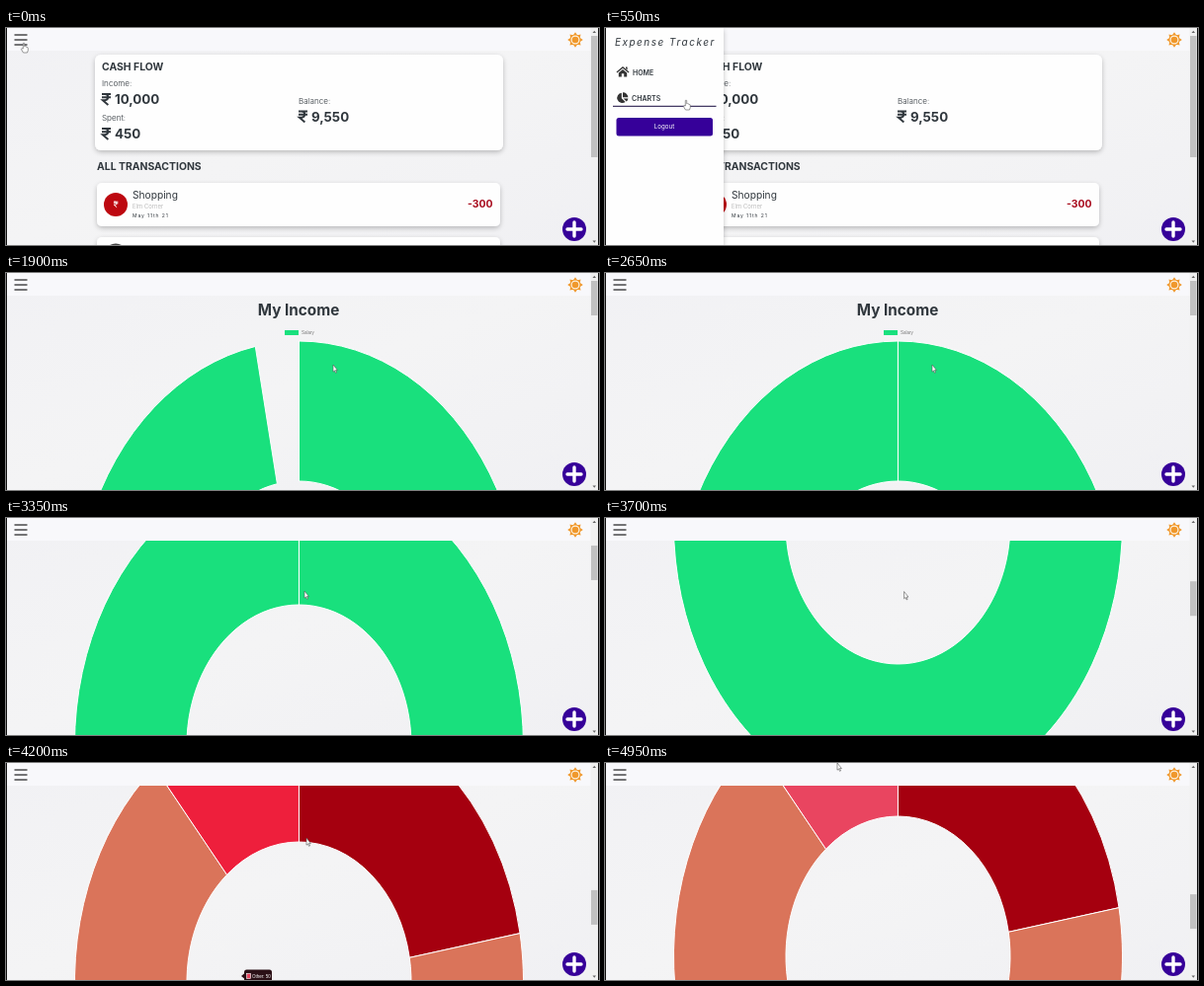
Animation of 600 by 220 pixels, one loop 5 s. Source, as an HTML page:

```html
<!DOCTYPE html>
<html lang="en">
<head>
<meta charset="utf-8">
<title>Expense Tracker</title>
<style>
html, body { margin: 0; width: 100%; height: 100%; overflow: hidden; background: #f2f2f4; }
svg { display: block; width: 600px; height: 220px; }
text { font-family: Inter, sans-serif; fill: #30373d; }
.h { font-weight: 700; font-size: 10.4px; }
.title { font-weight: 700; font-size: 15.3px; text-anchor: middle; }
.num { font-weight: 700; font-size: 13.3px; }
.label { font-weight: 300; font-size: 8.1px; }
.nav { font-weight: 600; font-size: 7px; }
.key { font-family: "Liberation Sans", Arial, sans-serif; font-size: 4.5px; fill: #777; }
</style>
</head>
<body>
<svg viewBox="0 0 600 220" xmlns="http://www.w3.org/2000/svg">
  <defs>
    <linearGradient id="paper" x2="1" y2="1">
      <stop offset="0" stop-color="#f1f1f4"/>
      <stop offset=".5" stop-color="#f4f4f5"/>
      <stop offset="1" stop-color="#f0f0f3"/>
    </linearGradient>
    <filter id="shade" x="-10%" y="-20%" width="120%" height="150%">
      <feDropShadow dx="0" dy="2" stdDeviation="2.5" flood-color="#000" flood-opacity=".24"/>
    </filter>
    <path id="rupee" d="M0 1H9M0 4.2H9M1 1H3.2C7.2 1 7.2 7.2 3.2 7.2H.8L6.4 12" fill="none" stroke-width="1.9"/>
  </defs>
  <rect width="600" height="220" fill="url(#paper)"/>

  <g id="home">
    <rect x="90" y="27" width="413" height="97" rx="6" fill="#fefefe" filter="url(#shade)"/>
    <text class="h" x="97" y="43">CASH FLOW</text>
    <text class="label" x="97" y="59">Income:</text>
    <text class="label" x="97" y="94">Spent:</text>
    <text class="label" x="296" y="77">Balance:</text>
    <g stroke="#30373d">
      <use href="#rupee" x="97" y="66"/>
      <use href="#rupee" x="97" y="101"/>
      <use href="#rupee" x="296" y="83.500"/>
    </g>
    <text class="num" x="110" y="77">10,000</text>
    <text class="num" x="110" y="112">450</text>
    <text class="num" x="309" y="95">9,550</text>
    <text class="h" x="92" y="143.500">ALL TRANSACTIONS</text>
    <rect x="92" y="157" width="408" height="44" rx="5" fill="#fefefe" filter="url(#shade)"/>
    <circle cx="111" cy="179" r="12" fill="#bd0810"/>
    <use href="#rupee" stroke="#fff" stroke-width="2" transform="translate(108.900 175.700) scale(.5)"/>
    <text x="128" y="172.500" font-size="10.200">Shopping</text>
    <text x="128" y="183" font-size="6" font-weight="300" style="fill:#aaa">Elm Corner</text>
    <text x="128" y="191.800" font-size="5" letter-spacing=".9">May 11th 21</text>
    <text class="h" x="492.500" y="182" text-anchor="end" style="fill:#a80a1c">-300</text>
    <rect x="92" y="212" width="408" height="44" rx="5" fill="#fefefe" filter="url(#shade)"/>
    <circle cx="111" cy="230.500" r="12" fill="#444"/>
  </g>

  <g id="charts">
    <text class="title" x="296" y="42.500">My Income</text>
    <g id="loaded">
      <g id="income"></g>
      <g transform="translate(0 615)">
        <text class="title" x="296" y="41">My Expenses</text>
        <g id="spent"></g>
        <g id="tip">
          <path d="M238 347l3-2.500v5z" fill="#2b1016"/>
          <rect x="241" y="340.500" width="28" height="13" rx="2.500" fill="#2b1016"/>
          <rect x="243.500" y="344.500" width="4" height="5" fill="#e94560" stroke="#fff" stroke-width=".6"/>
          <text class="key" x="249" y="348.600" style="fill:#fff">Other: 50</text>
        </g>
      </g>
    </g>
  </g>

  <rect width="600" height="23" fill="#f8f8fb"/>
  <path d="M8.500 7H21.500M8.500 12H21.500M8.500 17H21.500" stroke="#747476" stroke-width="2"/>
  <g transform="translate(576 12)">
    <path id="sun" fill="#f0982c"/>
    <circle r="3.900" fill="none" stroke="#fdf1df" stroke-width="1.200"/>
  </g>

  <g id="side">
    <rect x="-10" width="130" height="220" fill="#fefefe" filter="url(#shade)"/>
    <text x="10" y="17.500" font-size="10" font-style="italic" letter-spacing="1.500">Expense Tracker</text>
    <path d="M11.500 44.500L18 39l6.500 5.500-.8 1L18 40.800l-5.700 4.700zM21 39.500h1.600v3L21 41zM13.800 45.400L18 42l4.200 3.400V49.500H19.200V46.300H16.800V49.500H13.800z" fill="#333"/>
    <text class="nav" x="28" y="47.600">HOME</text>
    <path d="M16.800 65.700V71.200L20.600 75A5.200 5.200 0 1 1 16.800 65.700zM18 65.200A5.300 5.300 0 0 1 23.400 70.300H18zM18.700 71.400H23.400A5.300 5.300 0 0 1 21.800 74.600z" fill="#333"/>
    <text class="nav" x="27" y="74.300">CHARTS</text>
    <path id="under" d="M8 79.300H112.500" stroke="#433a63" stroke-width="1.200"/>
    <rect x="11.500" y="91" width="97.500" height="18.500" rx="2.500" fill="#360099"/>
    <text x="60" y="102.300" font-size="6.200" text-anchor="middle" style="fill:#fff">Logout</text>
  </g>

  <circle cx="575" cy="204" r="12" fill="#360099"/>
  <path d="M568 204H582M575 197V211" stroke="#fff" stroke-width="3.400" stroke-linecap="round"/>

  <rect x="591.500" width="7.500" height="220" fill="#f1f1f1"/>
  <path d="M593.500 5l1.800-2.200L597 5zM593.500 215.500l1.800 2.200 1.700-2.200z" fill="#666"/>
  <rect id="thumb" x="592" width="6.500" fill="#c1c1c1"/>
  <path d="M.5 0V220M599.500 0V220" stroke="#111"/>

  <g id="cursor" stroke="#555" stroke-width=".6" stroke-linejoin="round" fill="#fff">
    <path id="arrow" d="M0 0V7.200L1.500 5.900 2.500 8.300 3.500 7.900 2.500 5.500H4.400z"/>
    <path id="hand" d="M-.7 .5Q0-.5.7.5V3.800Q1.500 3.200 2 4.200 2.700 3.600 3.200 4.500 4.300 4.200 4.300 5.600V7.600L3.500 10H-.5L-2.600 6.600Q-2.600 5.200-.7 6z"/>
  </g>
</svg>
<script>
const LOOP = 5000, STEP = 50;
const CX = 296.5, CY = 353, RX = 227, RY = 284;
const $ = id => document.getElementById(id);

const INCOME = [["Salary", 10000, "#19e07d", 282]];
const SPENT = [
  ["Bills", 100, "#a5000f", 248],
  ["Shopping", 300, "#da745a", 277],
  ["Other", 50, "#e94560", 317]
];

// time, x, y of the pointer tip
const POINTER = [
  [0, 18, 15], [100, 18, 15], [500, 82, 73], [1250, 82, 73], [1800, 331, 93],
  [3200, 331, 93], [3350, 302, 74], [3950, 303, 75], [4200, 304, 76],
  [4500, 304, 76], [4900, 235, 0]
];
const SCROLL = [[3300, 0], [3350, 123], [3950, 507], [4200, 746], [4300, 772]];

const clamp = v => Math.max(0, Math.min(1, v));
const span = (t, a, b) => clamp((t - a) / (b - a));
const ease = p => p * p * (3 - 2 * p);
const outQuart = p => 1 - (1 - p) ** 4;

function track(keys, t, col = 1) {
  let i = 0;
  while (i < keys.length - 2 && t > keys[i + 1][0]) i++;
  const [a, b] = [keys[i], keys[i + 1]];
  return a[col] + (b[col] - a[col]) * span(t, a[0], b[0]);
}

function mix(a, b, p) {
  return "rgb(" + a.map((v, i) => Math.round(v + (b[i] - v) * p)) + ")";
}

function el(parent, tag, attrs) {
  const node = document.createElementNS("http://www.w3.org/2000/svg", tag);
  for (const k in attrs) node.setAttribute(k, attrs[k]);
  return parent.appendChild(node);
}

function makeRing(group, data) {
  return data.map(([name, value, color, x]) => {
    el(group, "rect", { x, y: 58, width: 14, height: 5, fill: color });
    el(group, "text", { class: "key", x: x + 17, y: 62.2 }).textContent = name;
    const node = el(group, "path", { fill: color, stroke: "#fff", "stroke-width": 1 });
    return { node, value };
  });
}

function point(angle, k) {
  return (CX + Math.sin(angle) * RX * k).toFixed(2) + " " + (CY - Math.cos(angle) * RY * k).toFixed(2);
}

function slice(a, b) {
  const big = b - a > Math.PI ? 1 : 0;
  return `M${point(a, 1)}A${RX} ${RY} 0 ${big} 1 ${point(b, 1)}` +
    `L${point(b, .5)}A${RX / 2} ${RY / 2} 0 ${big} 0 ${point(a, .5)}Z`;
}

function drawRing(ring, grow) {
  const total = ring.reduce((sum, s) => sum + s.value, 0);
  let a = 0;
  for (const s of ring) {
    const b = a + s.value / total * grow * (2 * Math.PI - .0005);
    s.node.setAttribute("d", grow > 0 ? slice(a, b) : "");
    a = b;
  }
}

const income = makeRing($("income"), INCOME);
const spent = makeRing($("spent"), SPENT);

let rays = "";
for (let i = 0; i < 32; i++) {
  const r = i % 4 === 0 ? 7.8 : i % 4 === 2 ? 5.3 : 6.1, a = i * Math.PI / 16;
  rays += (i ? "L" : "M") + (r * Math.sin(a)).toFixed(2) + " " + (-r * Math.cos(a)).toFixed(2);
}
$("sun").setAttribute("d", rays + "Z");

const show = (id, on) => $(id).setAttribute("display", on ? "inline" : "none");
const move = (id, x, y) => $(id).setAttribute("transform", `translate(${x} ${y})`);

function draw(t) {
  const onCharts = t >= 1200, loaded = t >= 1300;
  show("home", !onCharts);
  show("charts", onCharts);
  show("loaded", loaded);

  const scroll = track(SCROLL, t);
  move("charts", 0, -scroll);
  const grow = outQuart(span(t, 1320, 2320));
  drawRing(income, grow);
  drawRing(spent, grow);

  const hover = span(t, 4050, 4150) * (1 - span(t, 4250, 4400));
  spent[2].node.setAttribute("fill", mix([233, 69, 96], [238, 31, 60], hover));
  $("tip").setAttribute("opacity", hover);

  const open = ease(span(t, 50, 350)) - ease(span(t, 1300, 1600));
  move("side", -130 * (1 - open), 0);
  show("side", open > 0);
  show("under", t >= 450 && t < 1350);

  $("thumb").setAttribute("y", 8 + scroll / 6.17);
  $("thumb").setAttribute("height", loaded ? 35 : onCharts ? 82 : 123);

  move("cursor", track(POINTER, t), track(POINTER, t, 2));
  show("hand", t < 1350);
  show("arrow", t >= 1350);
}

function frame() {
  const t = performance.now() % LOOP;
  draw(Math.floor(t / STEP) * STEP);
  requestAnimationFrame(frame);
}
frame();
</script>
</body>
</html>
```
